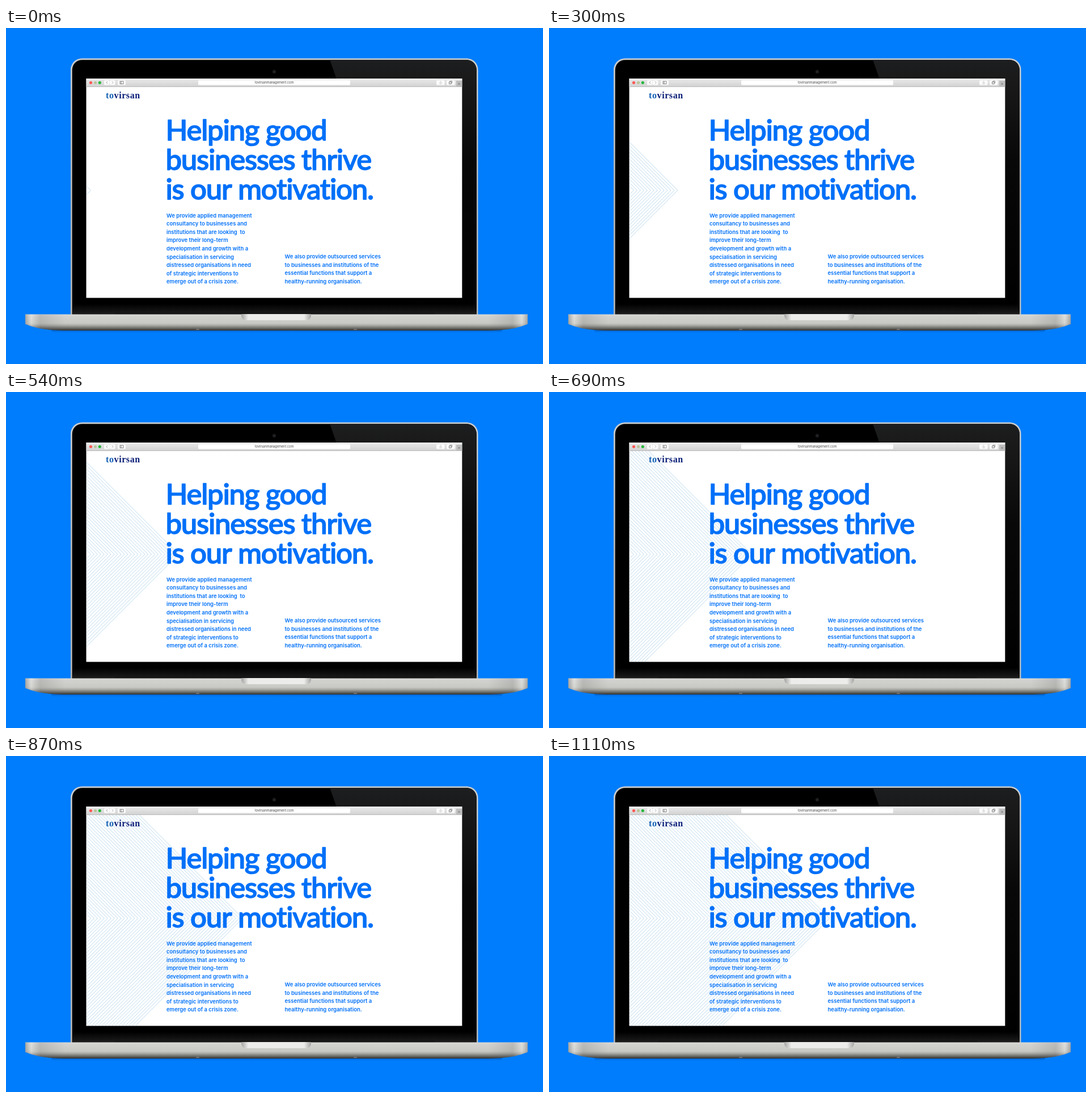
Animation, 947 px wide and 592 px high, one loop 2060 ms. Source, as an HTML page with a canvas:

```html
<!DOCTYPE html>
<html lang="en">
<head>
<meta charset="utf-8">
<title>Laptop</title>
<style>
html, body { margin: 0; width: 100%; height: 100%; overflow: hidden; background: #007dfc; }
canvas { display: block; }
</style>
</head>
<body>
<canvas id="stage" width="947" height="592"></canvas>
<script>
const W = 947, H = 592, LOOP = 2060, STEP = 30, LAST_STEP = 37;
const SCREEN = { x: 141.5, y: 89, w: 662.8, h: 386.5, bar: 15 };
const CHEVRON = { tip: 149.5, gap: 5.95, y: 286, color: '#a9cfe8' };

const canvas = document.getElementById('stage');
const still = document.createElement('canvas');
still.width = W;
still.height = H;
let ctx = still.getContext('2d');

function box(x, y, w, h, r, fill) {
  ctx.beginPath();
  ctx.roundRect(x, y, w, h, r);
  ctx.fillStyle = fill;
  ctx.fill();
}

function dot(x, y, r, fill) {
  ctx.beginPath();
  ctx.arc(x, y, r, 0, Math.PI * 2);
  ctx.fillStyle = fill;
  ctx.fill();
}

function line(points, color, width) {
  ctx.beginPath();
  points.forEach(([x, y]) => ctx.lineTo(x, y));
  ctx.strokeStyle = color;
  ctx.lineWidth = width;
  ctx.stroke();
}

function ramp(x0, y0, x1, y1, ...stops) {
  const g = ctx.createLinearGradient(x0, y0, x1, y1);
  stops.forEach(([at, color]) => g.addColorStop(at, color));
  return g;
}

function text(str, x, y, font, color, { spacing = 0, bolder = 0 } = {}) {
  ctx.font = font;
  ctx.letterSpacing = spacing + 'px';
  ctx.fillStyle = ctx.strokeStyle = color;
  ctx.fillText(str, x, y);
  if (bolder) {
    ctx.lineWidth = bolder;
    ctx.lineJoin = 'round';
    ctx.strokeText(str, x, y);
  }
  return ctx.measureText(str).width;
}

function lid() {
  box(114, 53.5, 718.5, 456, [20, 20, 4, 4], ramp(0, 54, 0, 505, [0, '#c9cdd0'], [0.5, '#b4b8bb'], [1, '#b4b8bb']));
  box(116.7, 56.2, 713.1, 452, [17.5, 17.5, 3, 3], '#000');
  ctx.save();
  ctx.beginPath();
  ctx.roundRect(116.7, 56.2, 713.1, 452, [17.5, 17.5, 3, 3]);
  ctx.clip();
  ctx.beginPath();
  [[571, 56], [831, 56], [831, 500], [728, 500]].forEach(([x, y]) => ctx.lineTo(x, y));
  ctx.fillStyle = ramp(0, 56, 0, 500, [0, '#1d1e1f'], [0.15, '#161616'], [0.4, '#080808'], [1, '#000']);
  ctx.fill();
  ctx.fillStyle = ramp(0, 486, 0, 505, [0, 'rgba(30,30,30,0)'], [1, '#1e1e1e']);
  ctx.fillRect(116, 486, 715, 20);
  ctx.restore();
  box(192, 499, 563, 6, 0, '#161616');
  dot(473, 77, 3.2, '#191a1c');
  dot(473, 77, 1.3, '#26282c');
}

function base() {
  const shadow = ramp(0, 529, 0, 537, [0, 'rgba(0,30,80,.6)'], [1, 'rgba(0,60,140,0)']);
  box(80, 527, 795, 10, 5, shadow);
  ctx.beginPath();
  ctx.moveTo(34, 504.5);
  ctx.lineTo(920, 504.5);
  ctx.lineTo(920, 521.5);
  ctx.bezierCurveTo(905, 528, 885, 533, 845, 533);
  ctx.lineTo(109, 533);
  ctx.bezierCurveTo(69, 533, 49, 528, 34, 521.5);
  ctx.closePath();
  ctx.fillStyle = ramp(0, 504, 0, 533, [0, '#dededb'], [0.1, '#d3d3d0'], [0.56, '#c8c8c4'],
    [0.68, '#adada8'], [0.86, '#6b6b67'], [1, '#2f3030']);
  ctx.fill();
  ctx.fillStyle = ramp(34, 0, 920, 0, [0, 'rgba(80,80,80,.35)'], [0.012, 'rgba(255,255,255,.25)'],
    [0.03, 'rgba(90,90,90,.2)'], [0.08, 'rgba(90,90,90,0)'], [0.92, 'rgba(90,90,90,0)'],
    [0.97, 'rgba(90,90,90,.2)'], [0.988, 'rgba(255,255,255,.25)'], [1, 'rgba(80,80,80,.35)']);
  ctx.fill();
  box(415, 504, 123, 10.8, [0, 0, 8, 8], ramp(415, 0, 538, 0, [0, '#a5a5a3'], [0.1, '#ececea'],
    [0.9, '#ececea'], [1, '#a5a5a3']));
  [338, 616].forEach(x => box(x - 3, 530, 6, 2, 1, '#777'));
}

function toolbar() {
  const { x, y, w, bar } = SCREEN;
  box(x, y, w, bar, 0, ramp(0, y, 0, y + bar, [0, '#ececec'], [1, '#d0d0d0']));
  box(x, y + bar - 0.7, w, 0.7, 0, '#b5b5b5');
  dot(149.5, 96.3, 2.6, '#fc5b57');
  dot(157.5, 96.3, 2.6, '#b9c49a');
  dot(165.3, 96.3, 2.6, '#28b83c');
  [[173, 9.5], [183, 9.5], [197, 14], [759, 14.5], [777, 14.5]].forEach(([bx, bw]) => box(bx, 92, bw, 8.4, 1.5, '#fbfbfb'));
  line([[179, 94], [177, 96.2], [179, 98.4]], '#777', 0.7);
  line([[187, 94], [189, 96.2], [187, 98.4]], '#999', 0.7);
  ctx.strokeStyle = '#666';
  ctx.lineWidth = 0.8;
  ctx.strokeRect(201, 94, 6, 4.5);
  line([[203, 94], [203, 98.5]], '#666', 0.8);
  ctx.strokeRect(781.5, 95, 3.5, 3.5);
  line([[783, 95], [783, 93.5], [786.5, 93.5], [786.5, 97], [785, 97]], '#666', 0.7);
  line([[765, 95], [765, 98.5], [768, 98.5], [768, 95]], '#bbb', 0.6);
  line([[766.5, 97], [766.5, 93]], '#bbb', 0.6);
  box(794, 93, 10, 11, 0, '#bdbdbd');
  line([[797, 98.5], [801, 98.5]], '#777', 0.7);
  line([[799, 96.5], [799, 100.5]], '#777', 0.7);
  box(339, 92, 268, 8.4, 1.5, '#fff');
  ctx.textAlign = 'center';
  text('tovirsanmanagement.com', 473, 98, '5.6px Inter, sans-serif', '#444');
  ctx.textAlign = 'left';
}

function copy() {
  const logo = 'bold 16px "Liberation Serif", serif';
  const first = text('to', 176, 123.5, logo, '#1460b4', { spacing: 0.6 });
  text('virsan', 176 + first, 123.5, logo, '#0b1f78', { spacing: 0.6 });

  const blue = '#0070f8';
  ['Helping good', 'businesses thrive', 'is our motivation.'].forEach((s, i) =>
    text(s, 281.5, 198 + i * 52, '500 51px Lato, sans-serif', blue, { spacing: -1.3, bolder: 1.5 }));

  const body = (lines, x, y) => lines.forEach((s, i) =>
    text(s, x, y + i * 14.56, '600 9.5px Inter, sans-serif', blue));
  body(['We provide applied management', 'consultancy to businesses and',
    'institutions that are looking  to', 'improve their long-term',
    'development and growth with a', 'specialisation in servicing',
    'distressed organisations in need', 'of strategic interventions to',
    'emerge out of a crisis zone.'], 283, 333.7);
  body(['We also provide outsourced services', 'to businesses and institutions of the',
    'essential functions that support a', 'healthy-running organisation.'], 491.5, 406);
}

// Five chevrons join every three steps, after a two-step pause.
function added(step) {
  return Math.max(0, Math.floor((step - 2) * 5 / 3));
}

function chevrons(count) {
  const { x, y, w, h, bar } = SCREEN;
  ctx.save();
  ctx.beginPath();
  ctx.rect(x, y + bar, w, h - bar);
  ctx.clip();
  for (let i = 0; i <= count; i++) {
    const tip = CHEVRON.tip + i * CHEVRON.gap;
    const reach = tip - x;
    line([[x, CHEVRON.y - reach], [tip, CHEVRON.y], [x, CHEVRON.y + reach]], CHEVRON.color, 0.8);
  }
  ctx.restore();
}

ctx.fillStyle = '#007dfc';
ctx.fillRect(0, 0, W, H);
lid();
base();
box(SCREEN.x, SCREEN.y, SCREEN.w, SCREEN.h, 0, '#fff');
toolbar();
ctx = canvas.getContext('2d');

function frame(now) {
  const step = Math.min(LAST_STEP, Math.floor(now % LOOP / STEP));
  ctx.drawImage(still, 0, 0);
  chevrons(added(step));
  copy();
  requestAnimationFrame(frame);
}
requestAnimationFrame(frame);
</script>
</body>
</html>
```
